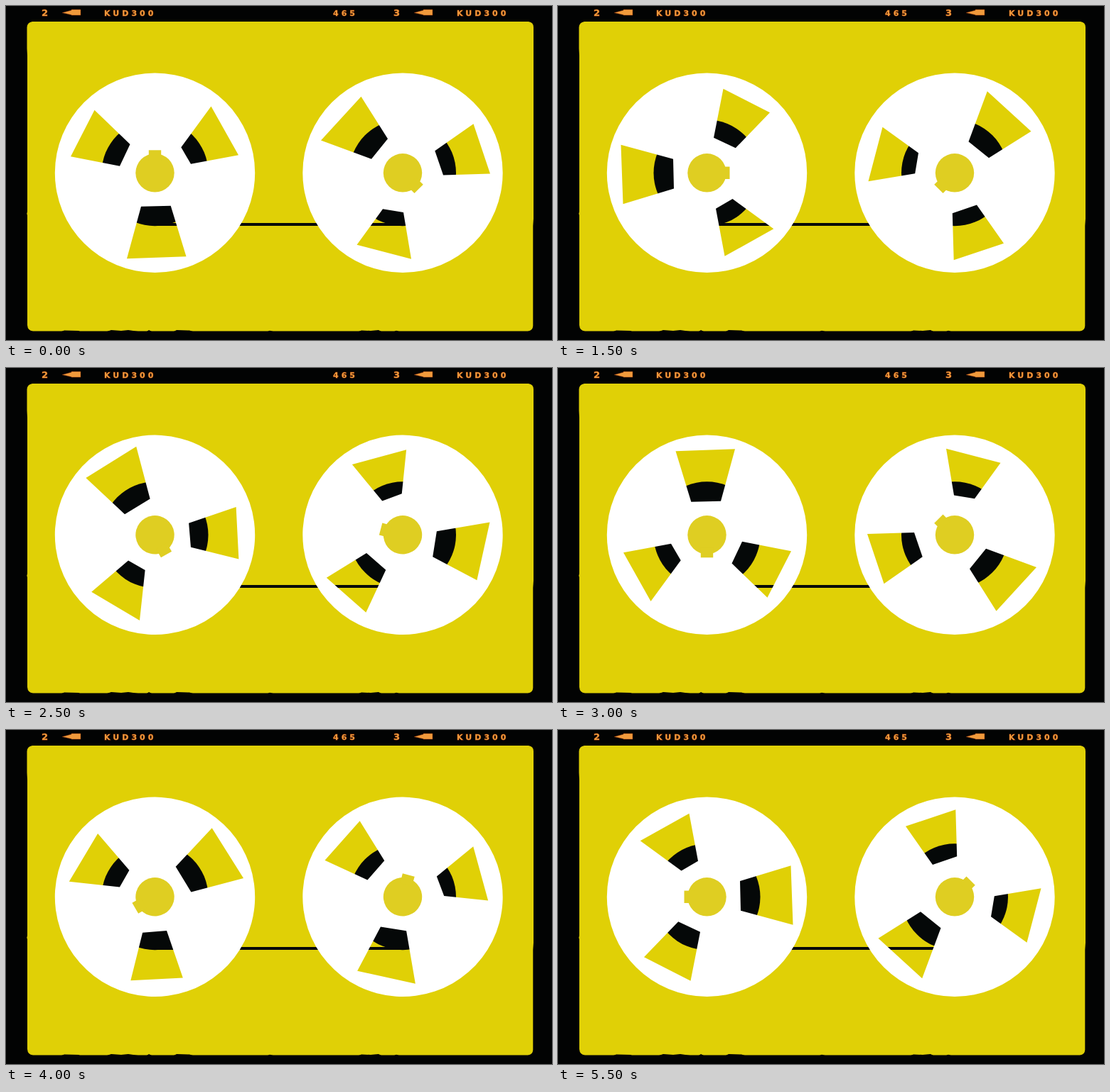
Animation of 768x471 px, one loop 6 s. Source, as an HTML page:

```html
<!DOCTYPE html>
<html lang="en">
<head>
<meta charset="utf-8">
<title>Tape reels</title>
<style>
  html, body { margin: 0; width: 100%; height: 100%; overflow: hidden; background: #020303; }
  svg { display: block; width: 768px; height: 471px; }
  text { font: bold 11px "DejaVu Sans", sans-serif; letter-spacing: 4px; fill: #f09a3c; stroke: #8a3008; stroke-width: .8px; paint-order: stroke; }
  .num { font-size: 13px; letter-spacing: 0; }
</style>
</head>
<body>
<svg viewBox="0 0 768 471">
  <defs>
    <path id="arrow" d="M0 4.5 L13 1 V0 H26 V8 H13 V7.5 Z" fill="#f09a3c" stroke="#8a3008" stroke-width=".5"/>
  </defs>
  <rect width="768" height="471" fill="#020303"/>
  <path id="window" fill="#e0d006" d="M37 22 H735 Q742 23 742 30 V300 L741.3 310 V451 Q741 458 734 458.5 H38 Q30.500 458 30 450 V295 L29.300 293 L30 290 V70 L29.500 60 V30 Q30 23 37 22 Z"/>
  <path id="chips" fill="#020303" d="M78 459 L82 457.500 L102 458 L104 459 Z M142 459 L148 457 L162 458 L172 457 L186 459 Z M198 459 L201 457 L205 459 Z M236 459 L240 457 L258 457.500 L263 459 Z M368 459 L371 457.800 L376 459 Z M496 459 L500 457.500 L513 458 L524 457 L528 459 Z M546 459 L549 457.800 L553 459 Z"/>
  <g id="edge-print">
    <text class="num" x="50" y="14">2</text>
    <use href="#arrow" x="79" y="5"/>
    <text x="138" y="13.500">KUD300</text>
    <text x="460" y="13.500">465</text>
    <text class="num" x="545" y="14">3</text>
    <use href="#arrow" x="574" y="5"/>
    <text x="634" y="13.500">KUD300</text>
  </g>
  <g fill="#050808">
    <circle cx="209.500" cy="235.300" r="75"/>
    <circle cx="558" cy="235.300" r="75"/>
    <rect x="209.500" y="306" width="348.500" height="4"/>
  </g>
  <g id="reels"></g>
</svg>
<script>
const STEP = 500, LOOP = 6000, CY = 235.3, R = 140.7;

// Window corners are relative to each reel's centre.
const reels = [
  { x: 209.5, key: 0, holes: [
    [-85, -88.5, -35, -40.3, -49.5, -9.5, -118.5, -23],
    [79, -93.8, 117.5, -25, 50.5, -12.5, 36.8, -36],
    [-39.5, 121, -19.5, 47.5, 22.2, 46.5, 44, 118]
  ] },
  { x: 558, key: 135, holes: [
    [-58.5, -107.5, -21, -48, -44, -19.5, -115, -45.8],
    [99.5, -69, 123, 1.3, 57, 3.2, 45.3, -31],
    [-28, 51, 1, 55.8, 12, 121.5, -64.5, 101.5]
  ] }
];

function add(parent, name, attrs) {
  const el = document.createElementNS("http://www.w3.org/2000/svg", name);
  for (const k in attrs) el.setAttribute(k, attrs[k]);
  return parent.appendChild(el);
}

const root = document.getElementById("reels");
for (const reel of reels) {
  reel.el = add(root, "g", {});
  const disc = `M${-R} 0A${R} ${R} 0 1 1 ${R} 0A${R} ${R} 0 1 1 ${-R} 0Z`;
  const cuts = reel.holes.map(h => `M${h.join(" ")}Z`).join("");
  add(reel.el, "path", { d: disc + cuts, fill: "#fff", "fill-rule": "evenodd" });
  const hub = add(reel.el, "g", { fill: "#dfce22", transform: `rotate(${reel.key})` });
  add(hub, "circle", { r: 27.2 });
  add(hub, "rect", { x: -8.7, y: -32, width: 17.4, height: 14 });
}

function draw(ms) {
  const step = Math.floor((ms % LOOP) / STEP);
  // The last step falls back to the position of two steps earlier.
  const angle = 30 * (step === 11 ? 9 : step);
  for (const { el, x } of reels) {
    el.setAttribute("transform", `translate(${x} ${CY}) rotate(${angle})`);
  }
}

const start = performance.now();
function tick() {
  draw(performance.now() - start);
  requestAnimationFrame(tick);
}
tick();
</script>
</body>
</html>
```
